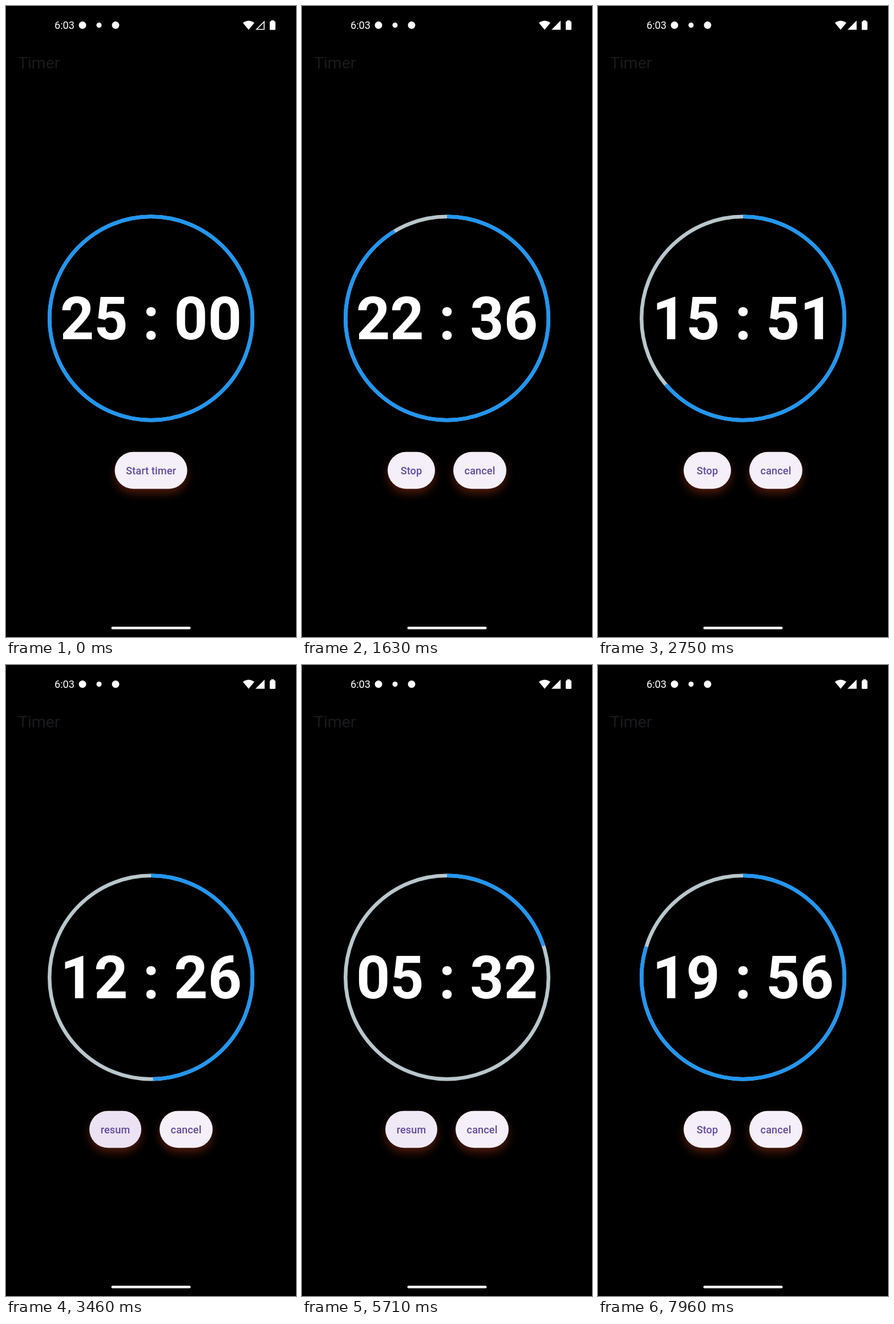
Recreate the animation shown at these times as an HTML page with a canvas. Size 508x1102 px, loop 8000 ms.

```html
<!DOCTYPE html>
<html lang="en">
<head>
<meta charset="utf-8">
<title>Timer</title>
<style>
  html, body { margin: 0; width: 100%; height: 100%; overflow: hidden; background: #000; }
  canvas { display: block; width: 508px; height: 1102px; }
</style>
</head>
<body>
<canvas id="stage" width="508" height="1102"></canvas>
<script>
const ctx = document.getElementById('stage').getContext('2d');
const LOOP = 8000, STEP = 1000 / 24, TAU = Math.PI * 2;
const FULL = 1500, SLIDE = 400;
const START = 1227, PAUSE = 3320, RESUME = 3948, PAUSE2 = 5098, CANCEL = 6333, RESTART = 7116;

// [ms, seconds left], linear in between
const COUNT = [
  [0, FULL], [START, FULL], [2208.3, 1146], [PAUSE, 746], [RESUME, 746], [4416.7, 576],
  [PAUSE2, 332], [CANCEL, 332], [CANCEL, FULL], [RESTART, FULL], [7958.3, 1196], [8200, 1109]
];
// [ms, button index, lingers after release]
const TAPS = [
  [START, 0, false], [PAUSE, 0, true], [RESUME, 0, true],
  [PAUSE2, 0, true], [CANCEL, 1, false], [RESTART, 0, false]
];
// label, left, width
const LAYOUT = {
  idle: [['Start timer', 190.5, 127]],
  running: [['Stop', 150, 83], ['cancel', 265, 93]],
  paused: [['resum', 146, 91], ['cancel', 269, 93]]
};

const clamp = v => Math.max(0, Math.min(1, v));

function secondsAt(t) {
  if (t <= 0) return FULL;
  let i = COUNT.length - 2;
  while (COUNT[i][0] > t) i--;
  const [t0, s0] = COUNT[i], [t1, s1] = COUNT[i + 1];
  return Math.round(s0 + (s1 - s0) * (t - t0) / (t1 - t0));
}

const minuteAt = t => Math.floor(secondsAt(t) / 60);

// The ring slides from the previous minute to the current one
function ringAt(t) {
  const now = minuteAt(t);
  let from = t;
  while (t - from < SLIDE && minuteAt(from) === now) from -= 2;
  const before = minuteAt(from);
  return (before + (now - before) * clamp((t - from) / SLIDE)) / 25;
}

function modeAt(t) {
  if (t < START || (t >= CANCEL && t < RESTART)) return 'idle';
  if ((t >= PAUSE && t < RESUME) || (t >= PAUSE2 && t < CANCEL)) return 'paused';
  return 'running';
}

function pressAt(t, index) {
  let a = 0;
  for (const [at, button, lingers] of TAPS) {
    const d = t - at;
    if (button !== index || d < -110 || (d >= 0 && !lingers)) continue;
    a = Math.max(a, Math.min(clamp((d + 110) / 100), clamp((750 - d) / 250)));
  }
  return a * 0.07;
}

function text(str, x, y, size, weight, color, align = 'center', spacing = 0) {
  ctx.font = `${weight} ${size}px Roboto, sans-serif`;
  ctx.letterSpacing = spacing + 'px';
  ctx.textAlign = align;
  ctx.fillStyle = color;
  ctx.fillText(str, x, y);
}

function pill(x, y, w, h, r, color) {
  ctx.fillStyle = color;
  ctx.beginPath();
  ctx.roundRect(x, y, w, h, r);
  ctx.fill();
}

function dot(x, y, r) {
  ctx.fillStyle = '#fff';
  ctx.beginPath();
  ctx.arc(x, y, r, 0, TAU);
  ctx.fill();
}

function statusBar(t) {
  text('6:03', 85, 40, 18.1, 400, '#fff', 'left');
  dot(134, 33.5, 6.5);
  dot(163, 33.5, 4.5);
  dot(192, 33.5, 6.5);

  // wifi
  ctx.beginPath();
  ctx.moveTo(425, 41.5);
  ctx.lineTo(415, 29.5);
  ctx.quadraticCurveTo(425, 22, 435, 29.5);
  ctx.closePath();
  ctx.fill();

  // mobile signal
  const full = t >= 1300, inset = full ? 0 : 0.8;
  ctx.beginPath();
  ctx.moveTo(453 - inset, 25.5 + inset * 2.4);
  ctx.lineTo(453 - inset, 41.5 - inset);
  ctx.lineTo(437 + inset * 2.4, 41.5 - inset);
  ctx.closePath();
  if (full) ctx.fill();
  else {
    ctx.strokeStyle = '#fff';
    ctx.lineWidth = 1.6;
    ctx.stroke();
  }

  pill(464.5, 25, 5, 4, 0.5, '#fff');
  pill(462, 26.8, 10, 15, 1.5, '#fff');
}

function arc(part, color) {
  ctx.strokeStyle = color;
  ctx.lineWidth = 6.46;
  ctx.beginPath();
  ctx.arc(254, 545.5, 177.8, -TAU / 4, -TAU / 4 + TAU * part);
  ctx.stroke();
}

function button(label, x, w, press) {
  ctx.save();
  ctx.shadowColor = 'rgba(255, 87, 34, 0.3)';
  ctx.shadowBlur = 16;
  ctx.shadowOffsetY = 8;
  pill(x, 778.7, w, 64.6, 32.3, '#f5eff9');
  ctx.restore();
  if (press) pill(x, 778.7, w, 64.6, 32.3, `rgba(103, 80, 164, ${press})`);
  text(label, x + w / 2, 817.5, 18.1, 500, '#604ba0', 'center', 0.13);
}

function draw(t) {
  ctx.fillStyle = '#000';
  ctx.fillRect(0, 0, 508, 1102);
  statusBar(t);
  text('Timer', 21, 109.3, 28.4, 400, '#1a191d', 'left');

  arc(1, '#b8c7cb');
  arc(ringAt(t), '#2196f3');

  const s = secondsAt(t), two = n => String(n).padStart(2, '0');
  text(`${two(Math.floor(s / 60))} : ${two(s % 60)}`, 254, 582, 103.4, 700, '#fff');

  LAYOUT[modeAt(t)].forEach(([label, x, w], i) => button(label, x, w, pressAt(t, i)));
  pill(184.5, 1084, 139, 4.6, 2.3, '#f4f4f4');
}

function frame() {
  const t = performance.now() % LOOP;
  draw(Math.floor(t / STEP + 0.12) * STEP);
  requestAnimationFrame(frame);
}
frame();
</script>
</body>
</html>
```
